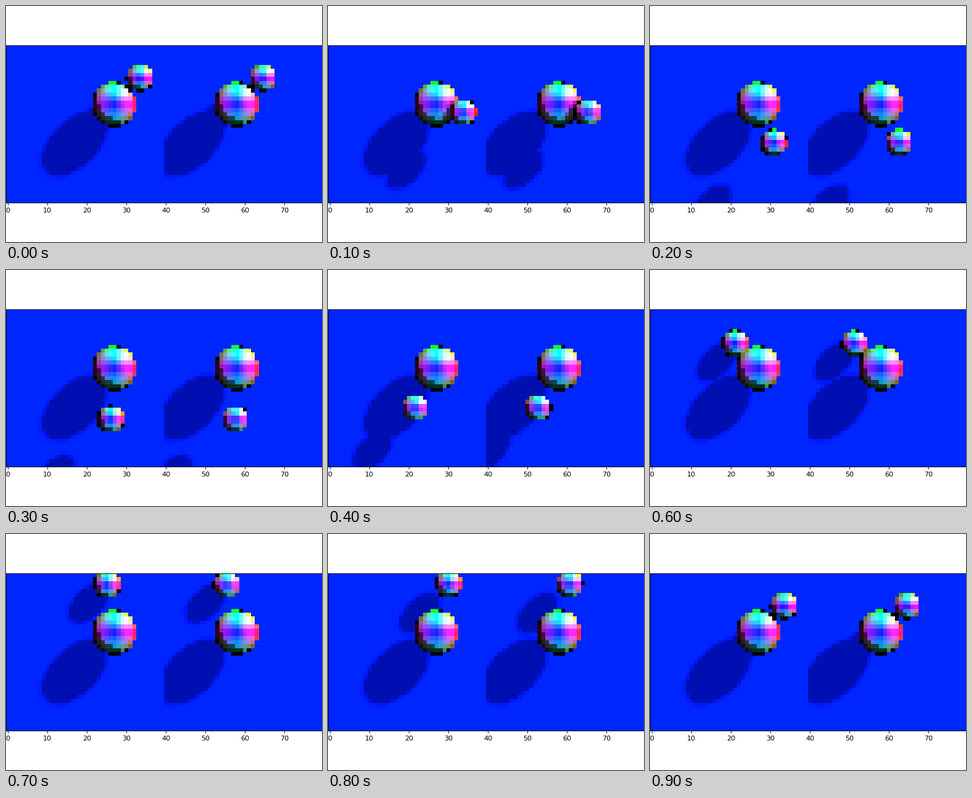
A matplotlib script that plays this animation: 512x384 px, repeating every 1000 ms.

```python
import numpy as np
import matplotlib.pyplot as plt
from matplotlib.animation import FuncAnimation

ROWS, COLS, STEPS = 40, 80, 10
LIGHT = np.array([1, -1, 1]) / np.sqrt(3)
FLOOR_NORMAL = np.array([0, -0.085, 0.996])
BIG = (np.array([26.8, 14.5, 10.0]), 5.6)
SMALL_RADIUS = 3.32
RIM = 0.11

v, u = np.mgrid[0:ROWS, 0:COLS].astype(float)


def view_shift(height):
    """Horizontal offset of a given height in the right-hand stereo view."""
    return np.where(u >= COLS // 2, 29.7 + 0.13 * height, 0)


def small_ball(step):
    a = 2 * np.pi * step / (STEPS - 1)
    c, s = np.cos(a), np.sin(a)
    center = np.array([26.79 + 6.61 * c + 2.92 * s,
                       14.5 - 6.65 * c + 11.07 * s,
                       10 + 1.2 * c + 5.6 * s])
    return center, SMALL_RADIUS


def light_reaching(points, balls):
    """Fraction of the lamp left at each point, with a soft shadow edge."""
    lit = np.ones(points.shape[:2])
    for center, radius in balls:
        to_ball = center - points
        along = to_ball @ LIGHT
        gap = np.sqrt(np.maximum((to_ball ** 2).sum(-1) - along ** 2, 0))
        lit = np.where(along > 0, np.minimum(lit, np.clip(gap - radius, 0, 1)), lit)
    return lit


def shade(normals, lit):
    facing = normals @ LIGHT
    lamp = np.where(facing > 0, 0.55 + 1.3 * facing ** 2, 0) * lit
    level = 0.71 * normals[..., 2] ** 2 + lamp
    return np.clip(np.abs(normals) * level[..., None], 0, 1)


def render(step):
    balls = [BIG, small_ball(step)]
    floor = np.dstack([u - view_shift(0), v, np.zeros_like(u)])
    image = shade(np.broadcast_to(FLOOR_NORMAL, floor.shape),
                  light_reaching(floor, balls))
    depth = np.zeros_like(u)
    for i, (center, radius) in enumerate(balls):
        dx = u - center[0] - view_shift(center[2])
        dy = v - center[1]
        dist = np.hypot(dx, dy)
        dz = np.sqrt(np.maximum(radius ** 2 - dist ** 2, 0))
        normals = np.dstack([dx, dy, dz]) / radius
        lit = light_reaching(center + radius * normals, [balls[1 - i]])
        color = shade(normals, lit)
        color[dist > radius] = 0
        front = (dist <= radius + RIM) & (center[2] + dz > depth)
        image[front] = color[front]
        depth[front] = (center[2] + dz)[front]
    return image


fig, ax = plt.subplots(figsize=(6.4, 4.8), dpi=80)
fig.subplots_adjust(left=0, right=1, bottom=0, top=1)
picture = ax.imshow(render(0), interpolation="nearest")


def update(step):
    picture.set_data(render(step))
    return [picture]


anim = FuncAnimation(fig, update, frames=STEPS, interval=100, repeat=True)
plt.show()
```
